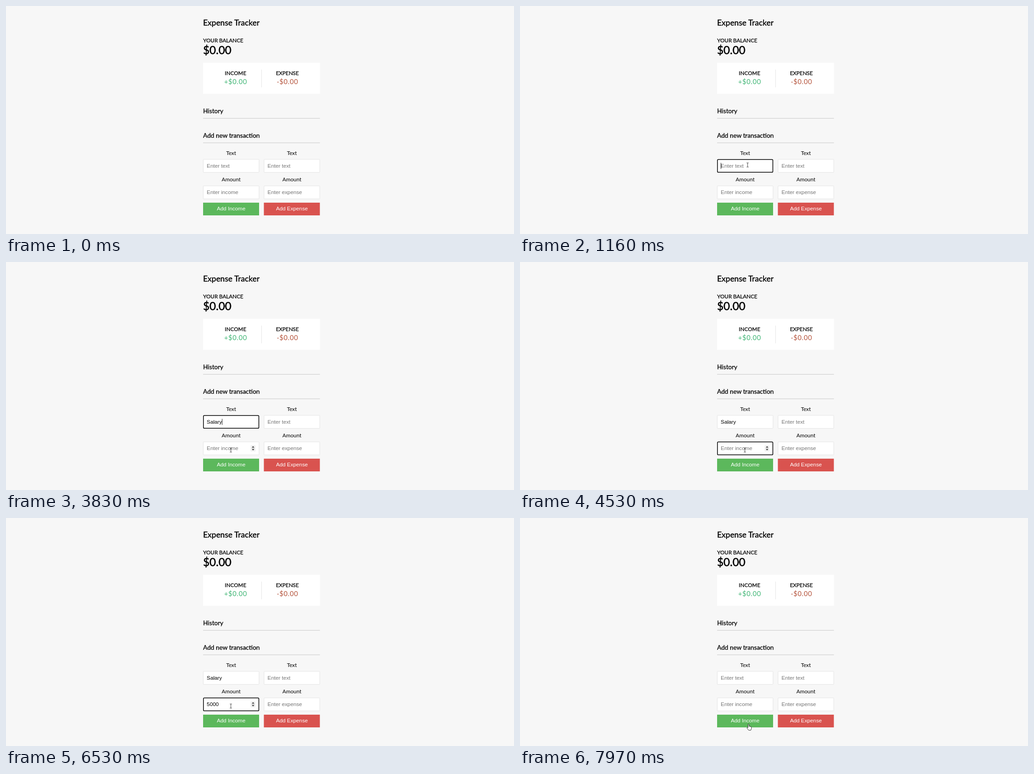
Animation of 1116 by 502 pixels, one loop 8 s. Source, as an HTML page:

```html
<!DOCTYPE html>
<html lang="en">
<head>
<meta charset="utf-8">
<title>Expense Tracker</title>
<style>
html, body { margin: 0; width: 100%; height: 100%; overflow: hidden; background: #f7f7f7; }
svg { display: block; }
text { font: 11.75px Lato, sans-serif; white-space: pre; }
.bold { stroke: #000; stroke-width: .022em; }
.mid { text-anchor: middle; }
.ui { font-family: "Liberation Sans", Arial, sans-serif; }
.title { font-size: 17.5px; }
.total { font-size: 24.3px; }
.head { font-size: 13.74px; }
.money { font-size: 14.68px; letter-spacing: .73px; }
.field { fill: #fff; stroke: #dedede; stroke-width: .8; }
.ring { fill: none; stroke: #000; stroke-width: 1.5; }
.rule { stroke: #bbb; stroke-width: .8; }
.hint { fill: #757575; }
.btn { fill: #fff; }
#cursor path { stroke-linejoin: round; }
</style>
</head>
<body>
<svg width="1116" height="502" viewBox="0 0 1116 502">
  <text class="bold title" x="433" y="42.6">Expense Tracker</text>
  <text class="bold" x="433" y="80.2">YOUR BALANCE</text>
  <text class="bold total" x="433" y="105.6">$0.00</text>

  <rect x="433" y="125" width="256.7" height="68.3" fill="#fff"/>
  <path d="M561.4 140V179" stroke="#dedede" stroke-width=".8"/>
  <text class="bold mid" x="504.3" y="151.8">INCOME</text>
  <text class="bold mid" x="618.1" y="151.8">EXPENSE</text>
  <text class="money mid" x="504.5" y="172.2" fill="#3fb574">+$0.00</text>
  <text class="money mid" x="618.3" y="172.2" fill="#b4523a">-$0.00</text>

  <text class="bold head" x="433" y="236.3">History</text>
  <path class="rule" d="M433 247.3H689.7M433 301.2H689.7"/>
  <text class="bold head" x="433" y="290.3">Add new transaction</text>

  <g id="form"></g>

  <g id="spinner">
    <rect x="537.5" y="403.5" width="10.5" height="13.5" fill="#efefef"/>
    <path d="M540 408.8L542.8 405.2L545.6 408.8zM540 411.4L542.8 415L545.6 411.4z" fill="#444"/>
  </g>
  <rect id="caret" width=".9" height="13.4"/>
  <g id="cursor">
    <path id="arrow" d="M.3 .4V10.2L2.6 8.2L4.1 11.6L5.6 10.9L4.1 7.6H7z" fill="#fff" stroke="#000" stroke-width=".8"/>
    <path id="beam" d="M-2.2 -4.6H-.6L0 -4L.6 -4.6H2.2M0 -4V4M-2.2 4.6H-.6L0 4L.6 4.6H2.2" fill="none" stroke="#222" stroke-width=".9"/>
    <path id="hand" d="M-1 8V1.3a1.1 1.1 0 0 1 2.2 0V5.2L5.4 6.1Q6.5 6.5 6.5 7.8V10.2L5 13.9H.4L-3.1 9.6Q-3.8 8.2 -2.6 7.6z" fill="#fff" stroke="#000" stroke-width=".8"/>
  </g>
</svg>
<script>
const $ = id => document.getElementById(id);

function column(x, kind, color) {
  const mid = x + 61.6;
  const low = kind.toLowerCase();
  const field = (y, name, hint) => `
    <rect class="field" x="${x + .4}" y="${y + .4}" width="122.4" height="28.8" rx="1"/>
    <rect class="ring" id="${name}Ring" x="${x + .75}" y="${y + .75}" width="121.7" height="28.1" rx="1.8"/>
    <text class="ui hint" id="${name}" x="${x + 8.1}" y="${y + 18.6}">${hint}</text>`;
  return `<text class="mid" x="${mid}" y="328">Text</text>
    <text class="mid" x="${mid}" y="386">Amount</text>
    ${field(337.2, low + "Text", "Enter text")}
    ${field(395.6, low + "Sum", "Enter " + low)}
    <g id="${low}Btn"><rect x="${x}" y="433" width="123" height="28" fill="${color}"/>
    <text class="ui mid btn" x="${mid}" y="450">Add ${kind}</text></g>`;
}
$("form").innerHTML = column(433, "Income", "#5cb85c") + column(566.5, "Expense", "#d9534f");

// Pointer legs: start time, number of steps, end points and ease-out power per axis.
const legs = [
  { start: 200, steps: 11, from: [1361, 524], to: [500, 350], power: [4.14, 2.14] },
  { start: 3510, steps: 5, from: [500, 350], to: [494, 414], power: [1.2, 1.2] },
  { start: 7350, steps: 4, from: [494, 414], to: [502, 453.4], power: [1, 1] }
];
const stepMs = 80;
// Focus and key presses restart the caret's blinking.
const caretResets = [1110, 1940, 2260, 2760, 4030, 5580, 6020, 6560];
const blinkMs = 500;
const focusSum = 3980, press = 7930, clear = 7970;

const show = (el, level) => el.setAttribute("opacity", Number(level));
const typed = (word, t, start, ms) =>
  t < start || t >= clear ? "" : word.slice(0, 1 + Math.floor((t - start) / ms));

function fill(el, value, hint) {
  const text = value || hint;
  if (el.textContent !== text) el.textContent = text;
  el.classList.toggle("hint", !value);
}

// A focus ring passes through half strength when it comes and goes.
function ringLevel(t, on, off) {
  const age = t - on, fade = t - off;
  if (age < 0 || fade >= stepMs) return 0;
  return age < stepMs || fade >= 0 ? .5 : 1;
}

function moveCursor(t) {
  const leg = legs.findLast(l => l.start <= t);
  show($("cursor"), !!leg);
  if (!leg) return;
  const step = 1 + Math.floor((t - leg.start) / stepMs);
  const left = Math.max(0, 1 - step / leg.steps);
  const [x, y] = leg.to.map((end, i) => end + (leg.from[i] - end) * left ** leg.power[i]);
  const inside = x > 433 && x < 690 && (x < 556 || x > 566);
  const shape = inside && y > 433 && y < 461 ? "hand"
    : inside && (y > 337 && y < 367 || y > 396 && y < 425) ? "beam" : "arrow";
  for (const id of ["arrow", "beam", "hand"]) show($(id), id === shape);
  $("cursor").setAttribute("transform", `translate(${x} ${y})`);
}

function drawCaret(t, second) {
  const el = $(second ? "incomeSum" : "incomeText");
  const width = el.classList.contains("hint") ? 0 : el.getComputedTextLength();
  const reset = caretResets.findLast(r => r <= t);
  const lit = Math.floor((t - reset) / blinkMs) % 2 === 0;
  $("caret").setAttribute("x", 441.1 + width);
  $("caret").setAttribute("y", second ? 403.7 : 345.3);
  show($("caret"), lit && t < press);
}

function draw(t) {
  const sum = t < 6560 ? "5000" : "500";
  fill($("incomeText"), typed("Salary", t, 1940, 155), "Enter text");
  fill($("incomeSum"), typed(sum, t, 5580, 122), "Enter income");
  show($("incomeTextRing"), ringLevel(t, 1080, focusSum));
  show($("incomeSumRing"), t < clear && ringLevel(t, focusSum, press));
  show($("expenseTextRing"), 0);
  show($("expenseSumRing"), 0);
  show($("spinner"), t >= 3750 && t < press);
  drawCaret(t, t >= focusSum);
  const pressed = t >= press && t < clear;
  $("incomeBtn").setAttribute("transform", pressed ? "translate(494.5 447) scale(.98) translate(-494.5 -447)" : "");
  moveCursor(t);
}

const start = performance.now();
function tick() {
  draw((performance.now() - start) % 8000);
  requestAnimationFrame(tick);
}
tick();
</script>
</body>
</html>
```
